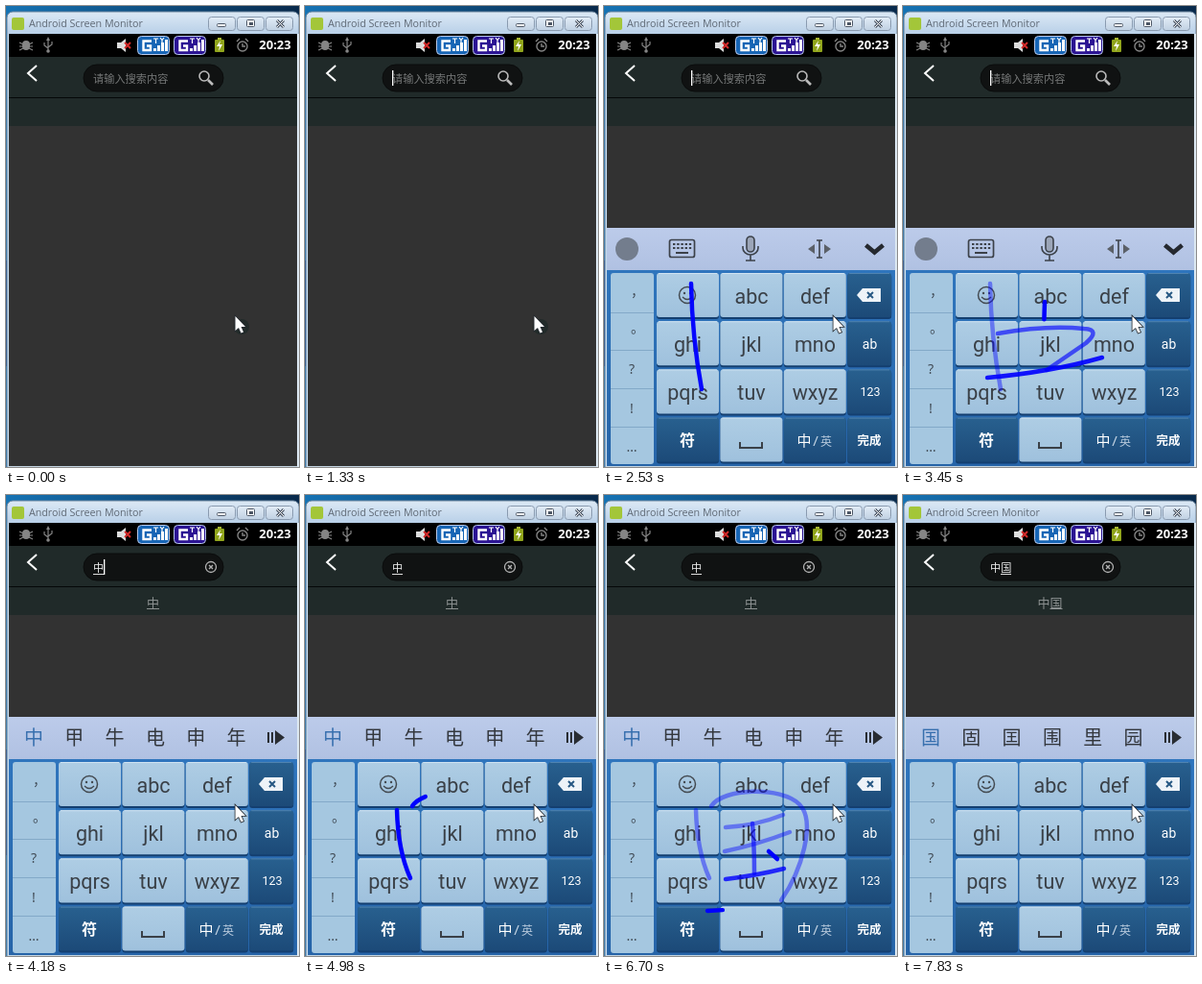
These frames come from a looping animation (306 by 480 pixels, 8000 ms). An HTML page with a canvas:

```html
<!DOCTYPE html>
<html lang="zh">
<head>
<meta charset="utf-8">
<style>
html, body { margin: 0; width: 306px; height: 480px; overflow: hidden; background: #222 }
canvas { display: block }
</style>
</head>
<body>
<canvas id="stage" width="306" height="480"></canvas>
<script>
const c = document.getElementById('stage').getContext('2d');
const LOOP = 8000, KEYS_UP = 1730, WORD1 = 4180, WORD2 = 7430;
const SANS = '"Noto Sans", "Open Sans", sans-serif';
const KEYS = 'Roboto, "Noto Sans", sans-serif';
const CJK = '"Noto Sans CJK SC", "Noto Sans CJK", sans-serif';

// The monitor repaints only at these moments
const ticks = [0, 600, 930, 1330, 1730, 2530, 2990, 3450, 3780, 4180, 4580,
  4980, 5440, 5840, 6300, 6700, 7100, 7430, 7830];

// Handwriting: evenly paced pen strokes, wiped when the word is recognised
const PEN = 180;
const words = [
  { start: 2170, gap: 420, end: WORD1, strokes: [
    'M91 289Q92 345 102 399',
    'M99 341Q150 332 189 336Q207 337 191 351L150 379',
    'M88 387Q155 381 208 366',
    'M148 308Q145 390 149 473'] },
  { start: 4680, gap: 285, end: WORD2, strokes: [
    'M96 328Q97 370 110 399',
    'M112 324C124 305 185 303 204 322C222 340 206 392 185 422',
    'M127 346Q160 344 187 333',
    'M126 371Q160 364 194 351',
    'M155 342Q157 365 157 394',
    'M127 400Q160 396 188 389',
    'M172 371L181 379',
    'M108 433Q165 430 223 425'] },
];
for (const word of words)
  word.strokes = word.strokes.map(d => {
    const el = document.createElementNS('http://www.w3.org/2000/svg', 'path');
    el.setAttribute('d', d);
    return { line: new Path2D(d), length: el.getTotalLength() };
  });

function rect(x, y, w, h, fill) { c.fillStyle = fill; c.fillRect(x, y, w, h); }

function box(x, y, w, h, r, fill, edge, line = 1) {
  c.beginPath();
  c.roundRect(x, y, w, h, r);
  if (fill) { c.fillStyle = fill; c.fill(); }
  if (edge) { c.strokeStyle = edge; c.lineWidth = line; c.stroke(); }
}

function fade(x0, y0, x1, y1, a, b) {
  const g = c.createLinearGradient(x0, y0, x1, y1);
  g.addColorStop(0, a);
  g.addColorStop(1, b);
  return g;
}

function path(d, color, width) {
  const p = new Path2D(d);
  if (width) { c.strokeStyle = color; c.lineWidth = width; c.stroke(p); }
  else { c.fillStyle = color; c.fill(p); }
}

function ring(x, y, r, color, width) {
  c.beginPath();
  c.arc(x, y, r, 0, 7);
  if (width) { c.strokeStyle = color; c.lineWidth = width; c.stroke(); }
  else { c.fillStyle = color; c.fill(); }
}

function text(s, x, y, size, color, font = SANS, align = 'center', weight = 400) {
  c.font = `${weight} ${size}px ${font}`;
  c.textAlign = align;
  c.fillStyle = color;
  c.fillText(s, x, y);
}

function drawWindow() {
  rect(0, 0, 306, 480, fade(0, 0, 306, 0, '#1673b4', '#08294b'));
  rect(0, 265, 1, 110, '#0c3f86');
  box(1, 6, 305, 480, [6, 6, 0, 0], fade(0, 6, 0, 29, '#dce9f5', '#b9d0e8'), '#6f879f');
  box(6, 12, 13, 13, 2, '#a3c639');
  text('Android Screen Monitor', 24, 22, 10.7, '#5f6975', '"Open Sans", sans-serif', 'left');
  for (let i = 0; i < 3; i++)
    box(211.5 + i * 30, 11.5, 28, 14, 3, fade(0, 11, 0, 26, '#e3edf7', '#bfd0e2'), '#8a9bb0');
  box(220.5, 18.5, 9, 3, 1, '#fff', '#4c5665');
  box(251.5, 14.5, 8, 7, 1, '#fff', '#4c5665');
  rect(254, 17, 4, 3, '#4c5665');
  path('M283 15l7 7M290 15l-7 7', '#4c5665', 3);
  path('M283 15l7 7M290 15l-7 7', '#fff', 1);
}

function signal(x, fill) {
  c.save();
  c.translate(x, 0);
  box(.5, 31.5, 33, 19, 4, fill, '#b9c9ea');
  path('M15 36.500h-8.500v9.500h7.500v-4.500h-4', '#fff', 2.4);
  path('M17 34h5M19.500 34v5M24 33l2 2.500 2-2.500M26 35v3', '#fff', 1.2);
  for (let i = 0; i < 4; i++) rect(17 + i * 4, 44 - i * 3, 3, 3 + i * 3, '#fff');
  c.restore();
}

function drawStatus() {
  const gray = '#858585';
  rect(3, 29, 301, 24, '#000');
  box(17, 36, 8, 10, 4, gray);
  path('M14 38l4 2M14 42h4M14 46l4-2M28 38l-4 2M28 42h-4M28 46l-4-2', gray, 1.2);
  path('M44 34v13M40 38v3l4 3M48 37v3l-4 3', gray, 1.2);
  path('M42 36l2-4 2 4z', gray);
  ring(44, 47, 1.8, gray);
  path('M116 38h4l5-4v14l-5-4h-4z', '#ddd');
  path('M124 38l6 6M130 38l-6 6', '#d52b2b', 2);
  signal(137, '#1765b5');
  signal(175, '#2b1393');
  rect(221, 33, 4, 2, '#a8b832');
  box(218, 35, 10, 13, 1, '#91a51c');
  path('M224 36l-4 6h3l-1 5 4-7h-3z', '#fff');
  ring(247, 42, 5, gray, 1.4);
  path('M247 39v3h3M241 37l3-3M253 37l-3-3', gray, 1.4);
  text('20:23', 281, 45, 13, '#fff', SANS, 'center', 700);
}

function drawSearch(t) {
  rect(3, 53, 301, 427, '#323232');
  rect(3, 53, 301, 72, '#202a29');
  rect(3, 95, 301, 1, '#050808');
  path('M32 62l-9 8 9 8', '#fff', 2);
  box(81, 61, 146, 28, 14, '#101212', '#0a0c0c');
  const word = t >= WORD2 ? '中国' : t >= WORD1 ? '中' : '';
  const n = word.length;
  if (n) {
    text(word, 91, 80, 11.2, '#eee', CJK, 'left', 500);
    rect(80 + n * 11, 82, 11, 1, '#ddd');
    text(word, 153.5, 117, 13, '#8d9292', CJK);
    rect(140.5 + n * 6.5, 118, 13, 1, '#8d9292');
    ring(214, 75, 5.5, '#b0b0b0', 1.3);
    path('M212 73l4 4M216 73l-4 4', '#b0b0b0', 1.4);
  } else {
    text('请输入搜索内容', 91, 80, 11.2, '#757777', CJK, 'left');
    ring(207, 73, 5, '#bbb', 1.6);
    path('M211 77l5 5', '#bbb', 2.6);
  }
  const blink = t % 990;
  if (blink > 100 && blink < 610) rect(91 + n * 11, 67, 1.3, 16, '#fff');
}

function key(x, y, w, dark) {
  const [top, bottom, shine] = dark
    ? ['#28608f', '#1c4a78', '#4f83b0'] : ['#aecde4', '#9fc1dd', '#cfe3f2'];
  box(x, y + 1, w, 47, 3, '#143f70');
  box(x, y, w, 46, 3, fade(0, y, 0, y + 46, top, bottom));
  rect(x + 2, y, w - 4, 1, shine);
}

function drawTools() {
  const ink = '#3c4149';
  ring(24, 253, 12, '#737d8d');
  box(68.5, 243.5, 26, 18, 2, null, ink, 1.7);
  for (let i = 0; i < 10; i++) rect(72 + i % 5 * 4.2, 247 + (i / 5 | 0) * 4, 2.4, 2, ink);
  rect(75, 256, 13, 2, ink);
  box(149, 240, 8, 16, 4, '#9ba5b8', ink, 1.6);
  path('M145 250v2a8 7 0 0 0 16 0v-2M153 259v6M148 265h10', ink, 1.6);
  path('M225 244v18M222 244h6M222 262h6', ink, 1.6);
  path('M220 248v10l-7-5zM230 248v10l7-5z', '#5b6068');
  path('M273.500 249l9 7.500 9-7.500', '#25292f', 4.6);
}

function drawCandidates(list) {
  [...list].forEach((s, i) =>
    text(s, 29 + i * 42.3, 260, 20, i ? '#33373d' : '#376fae', CJK));
  path('M274 247v11M278 247v11', '#292d33', 2);
  path('M281 245l10 7.500-10 7.500z', '#292d33');
}

function drawKeyboard(t) {
  const ink = '#3a4047';
  rect(3, 231, 301, 45, fade(0, 231, 0, 276, '#bccbea', '#b0c1e2'));
  if (t >= WORD2) drawCandidates('国固囯围里园');
  else if (t >= WORD1) drawCandidates('中甲牛电申年');
  else drawTools();

  rect(3, 275, 301, 205, fade(0, 275, 0, 480, '#2f75bd', '#2664a8'));
  box(7, 278, 45, 199, 3, '#a5c7e0');
  [...'，。?!…'].forEach((s, i) => {
    if (i) rect(7, 279.5 + i * 39.7 | 0, 45, 1, '#83a9c8');
    const wide = i < 2;
    text(s, wide ? 35 : 29, 302 + i * 40.5 - (wide ? i * 3 : 0), 14, '#414b55', wide ? CJK : SANS);
  });

  for (let row = 0; row < 4; row++)
    for (let col = 0; col < 4; col++)
      key(55 + col * 66.4, 278 + row * 50.2, col < 3 ? 65 : 46, col === 3 || row === 3 && col !== 1);
  ['abc', 'def', 'ghi', 'jkl', 'mno', 'pqrs', 'tuv', 'wxyz'].forEach((s, n) => {
    const i = n + 1;
    text(s, 87.5 + i % 3 * 66.5, 310 + (i / 3 | 0) * 50.2, 21.5, ink, KEYS);
  });

  ring(87, 301, 8.5, '#444b52', 1.5);
  for (const x of [84, 90]) ring(x, 299, 1.2, '#444b52');
  path('M82 303q5 5 10 0', '#444b52', 1.4);
  path('M264 301l6-7h19v14h-19z', '#eef3f8');
  path('M275 298l6 6M281 298l-6 6', '#265783', 2);
  text('ab', 277.5, 357, 14, '#fff', KEYS);
  text('123', 278, 406, 12.5, '#fff', KEYS);
  text('符', 87, 458, 16, '#fff', CJK, 'center', 700);
  path('M142 454v6h23v-6', ink, 2);
  text('中', 209, 458, 15, '#fff', CJK, 'center', 500);
  text('/', 221, 458, 15, '#c3d3e3');
  text('英', 232, 458, 12, '#b7c9dc', CJK);
  text('完成', 277, 457, 12.5, '#fff', CJK, 'center', 700);
}

function drawInk(t) {
  c.save();
  c.lineCap = c.lineJoin = 'round';
  c.lineWidth = 4.5;
  for (const { start, gap, end, strokes } of words)
    strokes.forEach(({ line, length }, i) => {
      const age = t - start - i * gap;
      if (age <= 0 || t >= end) return;
      const alpha = Math.max(.42, 1.08 - Math.max(0, age - PEN) / 1500);
      c.strokeStyle = `rgba(0,0,255,${Math.min(1, alpha)})`;
      c.setLineDash([length * Math.min(1, age / PEN), length * 2]);
      c.stroke(line);
    });
  c.restore();
}

function drawPointer(t) {
  if (t < KEYS_UP) ring(246, 334, 8, '#222b2a');
  const arrow = 'M239.500 323v15l3.500-3 2.500 5.500 2.500-1-2.500-5.500h4.500z';
  path(arrow, '#252a30', 1.6);
  path(arrow, '#fff');
}

function draw(time) {
  const t = ticks.findLast(k => k <= time);
  drawWindow();
  drawStatus();
  drawSearch(t);
  if (t >= KEYS_UP) drawKeyboard(t);
  drawInk(t);
  drawPointer(t);
  rect(2, 29, 1, 451, '#c3daed');
  rect(304, 29, 2, 451, '#dce8f2');
  rect(3, 479, 301, 1, '#c3d3e0');
}

const begin = performance.now();
function loop() {
  draw((performance.now() - begin) % LOOP);
  requestAnimationFrame(loop);
}
loop();
</script>
</body>
</html>
```
